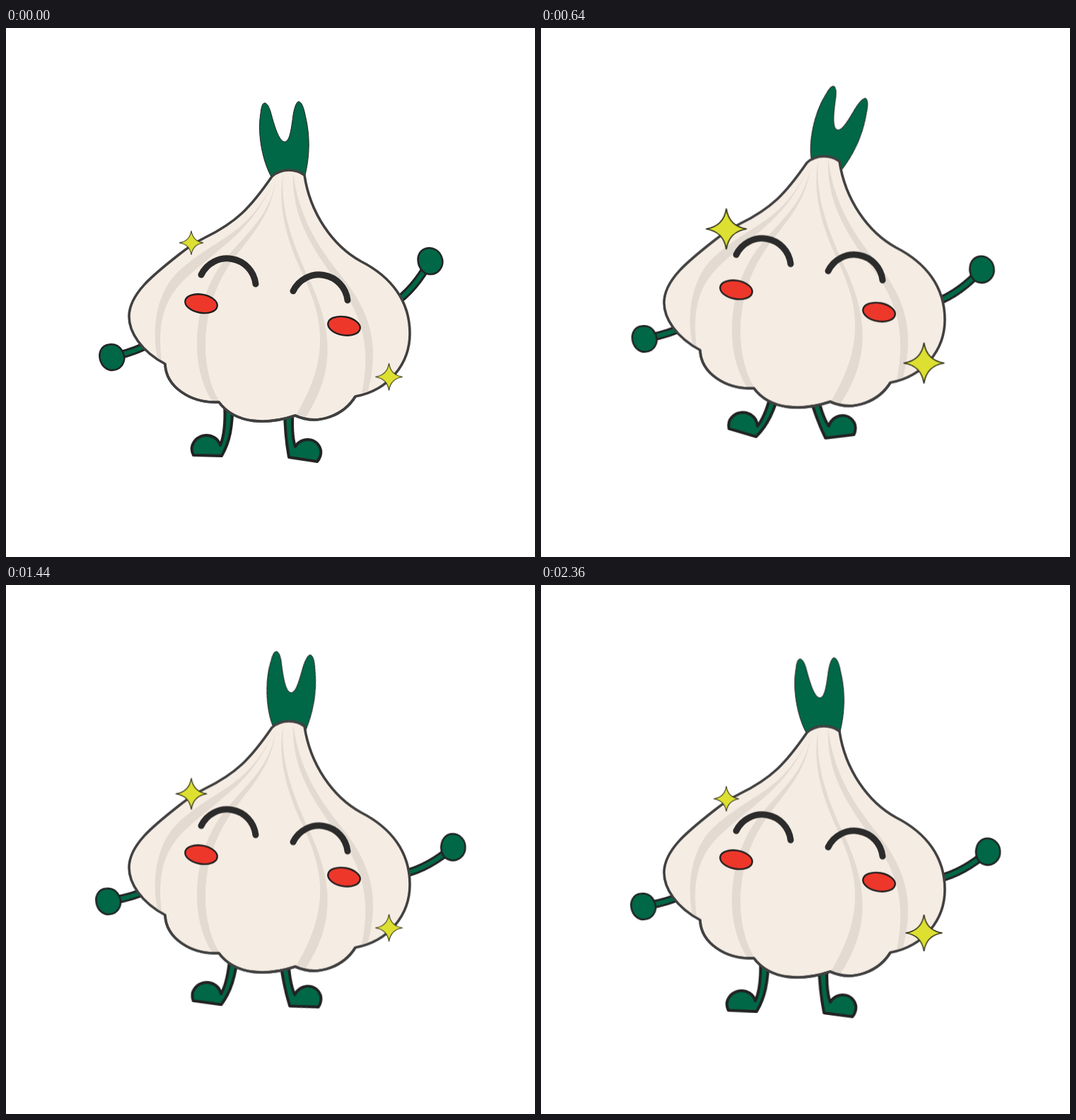
Write an HTML page that moves like this. It is 748 by 748 pixels and loops after 2.4 s.

```html
<!DOCTYPE html>
<html lang="en">
<head>
<meta charset="utf-8">
<title>Dancing garlic</title>
<style>
  html, body { margin: 0; height: 100%; overflow: hidden; background: #fff; }
  svg { display: block; width: 100vw; height: 100vh; }

  .green { fill: #006747; stroke: #222; stroke-linejoin: round; }
  .leg { stroke-width: 4; }
  .fist { stroke-width: 2.5; }
  .limb { fill: none; stroke: #222; stroke-width: 12; }
  .limb.in { stroke: #006747; stroke-width: 6; }
  .skin { fill: #f5ece3; stroke: #404040; stroke-width: 3.6; stroke-linejoin: round; }
  .folds { fill: #e3dad1; }
  .eyes { fill: none; stroke: #2b2b2b; stroke-width: 9; stroke-linecap: round; }
  .cheek { fill: #ee372b; stroke: #1f1f1f; stroke-width: 2.3; }
  .star { fill: #dde031; stroke: #33331c; stroke-width: 1; stroke-linejoin: miter; }

  .bob { animation: bob 600ms linear infinite alternate; }
  .stem { transform-origin: 400px 222px; animation: sway 600ms cubic-bezier(.37, 0, .63, 1) infinite alternate; }
  .leg { --turn: 16.2deg; animation: turn 600ms linear infinite alternate; }
  .leg.l { transform-origin: 333px 598px; }
  .leg.r { transform-origin: 373px 595px; --turn: -16.5deg; }
  .arm { animation: wave 2400ms cubic-bezier(.37, 0, .63, 1) infinite; }
  .arm.l { transform-origin: 292px 385px; --swing: 3.9deg; }
  .arm.r { transform-origin: 482px 442px; --swing: 21.2deg; }
  .eyes { animation: lift 2400ms cubic-bezier(.37, 0, .63, 1) infinite; }
  .star.a { animation: grow 600ms linear infinite alternate; }
  .star.b { animation: twinkle 2400ms linear infinite; }

  @keyframes bob { to { transform: translateY(-21px); } }
  @keyframes sway { to { transform: rotate(23.4deg); } }
  @keyframes turn { to { transform: rotate(var(--turn)); } }
  @keyframes grow { to { transform: scale(1.75); } }
  @keyframes wave {
    0%, 41.6667%, 83.3333% { transform: rotate(0deg); }
    16.6667%, 58.3333%, 100% { transform: rotate(var(--swing)); }
  }
  @keyframes lift {
    0%, 62.5%, 100% { transform: translateY(0); }
    31.25% { transform: translateY(-9.3px); }
  }
  @keyframes twinkle {
    0%, 10%, 60% { transform: scale(1); }
    35%, 85% { transform: scale(1.75); }
    100% { transform: scale(1.3); }
  }
</style>
</head>
<body>
<svg viewBox="0 0 748 748">
  <defs>
    <path id="armL" d="M158 463Q182 458 208 444"/>
    <path id="armR" d="M540 395Q572 376 594 339"/>
    <path id="eye" d="M276 349A40.6 40.6 0 0 1 353 362"/>
    <path id="spark" d="M0-17Q2.2-2.2 17 0Q2.2 2.2 0 17Q-2.2 2.2-17 0Q-2.2-2.2 0-17Z"/>
  </defs>
  <g class="bob">
    <g class="arm l">
      <use href="#armL" class="limb"/><use href="#armL" class="limb in"/>
      <path class="green fist" d="M146 447.5C133 449 130 462 134 472C139 484 151 487 160 481C168 475 169 465 165 458C161 450 154 446 146 447.5Z"/>
    </g>
    <g class="arm r">
      <use href="#armR" class="limb"/><use href="#armR" class="limb in"/>
      <path class="green fist" d="M597 348C611 350 619 338 617 327C614 314 603 309 593 312C582 316 581 327 584 336C587 343 591 347 597 348Z"/>
    </g>
    <path class="green leg l" d="M308.5 522C311 555 308 578 303 590C296 570 268 572 263 592C262 597 264 602 265 604L305 605C316 586 321 565 320.5 522"/>
    <path class="green leg r" d="M394.5 522C393 560 396 585 400 607L440 613C444 609 446 602 445 597C441 579 418 577 409 592C405 580 404 565 406 522"/>
    <path class="green stem" stroke-width="1" d="M376 212C363 190 355 150 360 121C361 110 363 106 366 106C370 107 372 112 374 118C380 140 386 160 394 161C401 160 403 146 406 123C408 111 411 104 414 104C418 105 421 112 423 123C431 155 429 185 422 212Z"/>

    <path class="skin" d="M376 210Q386 201 400 201Q413 201 422 208C430 262 462 308 502 330C545 352 571 386 571 432C571 474 542 512 494 521C478 547 442 563 409 548C370 561 325 561 301 529C262 531 226 508 225 475C191 457 174 430 174 408C174 376 208 349 245 320C260 308 270 302 282 296C325 275 345 255 376 210Z"/>
    <g class="folds">
      <path d="M380 214C340 297 300 293 243 345C215 372 205 420 214 466L220 470C214 420 222 385 252 356C310 303 345 290 380 214Z"/>
      <path d="M381 214C374 270 330 298 304 335C268 385 256 470 291 527L301 527C272 478 276 395 314 338C340 298 376 270 381 214Z"/>
      <path d="M392 206C384 250 395 295 418 345C446 405 462 460 411 546L424 550C470 480 458 420 430 358C400 295 388 250 392 206Z"/>
      <path d="M406 205C404 262 428 305 463 352C500 398 518 445 503 517L512 513C530 445 512 398 476 353C438 306 414 265 406 205Z"/>
    </g>
    <path class="skin" style="fill:none" d="M225 475C226 508 262 531 301 529C325 561 370 561 409 548C442 563 478 547 494 521"/>

    <ellipse class="cheek" rx="23" ry="13" transform="translate(276 389.7) rotate(10)"/>
    <ellipse class="cheek" rx="23" ry="13" transform="translate(478 421.3) rotate(10)"/>
    <g class="eyes"><use href="#eye"/><use href="#eye" x="130" y="23"/></g>

    <g transform="translate(262 303.7)"><use href="#spark" class="star a"/></g>
    <g transform="translate(541.5 493.3) scale(1.13)"><use href="#spark" class="star b"/></g>
  </g>
</svg>
</body>
</html>
```
